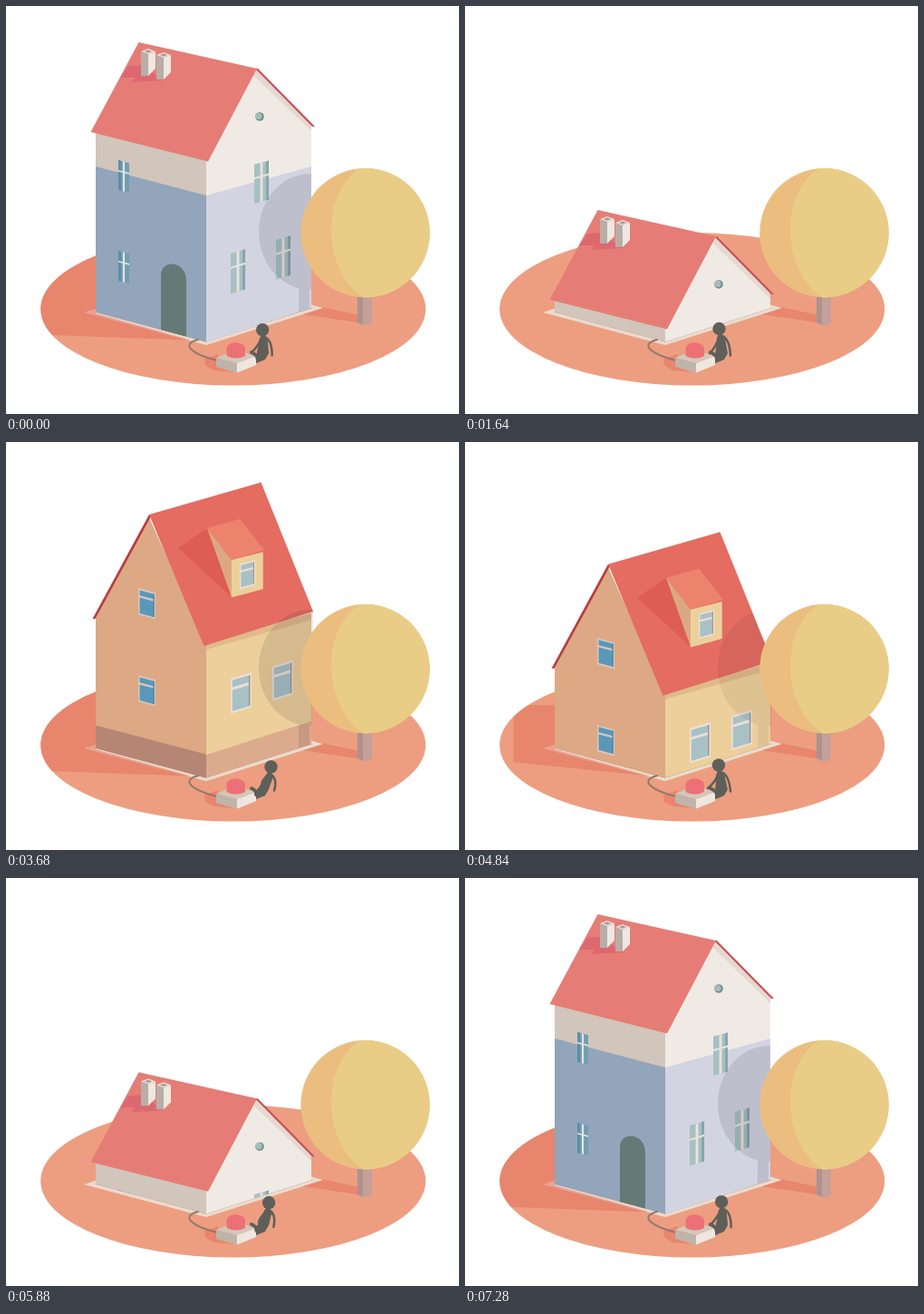
An HTML page with a canvas that plays this animation: 500x450 px, repeating every 7480 ms.

```html
<!DOCTYPE html>
<html lang="en">
<head>
<meta charset="utf-8">
<title>House switch</title>
<style>
html, body { margin: 0; width: 100%; height: 100%; overflow: hidden; background: #fff; }
canvas { display: block; }
</style>
</head>
<body>
<canvas id="stage" width="500" height="450"></canvas>
<script>
const ctx = document.getElementById('stage').getContext('2d');
const LOOP = 7480, DEPTH = 345;
const INK = '#5f5f59';

const clamp = v => Math.min(1, Math.max(0, v));
const ease = u => (1 - Math.cos(Math.PI * clamp(u))) / 2;
const span = (t, from, to) => ease((t - from) / (to - from));

function trace(pts) {
  ctx.beginPath();
  for (let i = 0; i < pts.length; i += 2) ctx.lineTo(pts[i], pts[i + 1]);
  ctx.closePath();
}
function poly(color, ...pts) {
  trace(pts);
  ctx.fillStyle = color;
  ctx.fill();
}
function oval(color, x, y, rx, ry = rx) {
  ctx.beginPath();
  ctx.ellipse(x, y, rx, ry, 0, 0, 7);
  ctx.fillStyle = color;
  ctx.fill();
}
function curve(color, width, x, y, cx, cy, ex, ey) {
  ctx.beginPath();
  ctx.moveTo(x, y);
  ctx.quadraticCurveTo(cx, cy, ex, ey);
  ctx.strokeStyle = color;
  ctx.lineWidth = width;
  ctx.lineCap = 'round';
  ctx.stroke();
}
function scoped(draw) {
  ctx.save();
  draw();
  ctx.restore();
}

// Walls map (u along the wall, height h) to the stage; the right one recedes.
const left = (u, h) => [99 + 122 * u, 339 + 32 * u - h];
const right = (u, h) => [221 + 116 * u, 371 - 38 * u - h * (1 - .037 * u)];

function quad(wall, color, u, h, w, t) {
  poly(color, ...wall(u, h), ...wall(u + w, h), ...wall(u + w, h + t), ...wall(u, h + t));
}
const inset = (wall, u, h, w, t) => (color, x, y, pw, ph) =>
  quad(wall, color, u + x * w, h + y * t, pw * w, ph * t);

function gable(wall, color, eave, peak) {
  poly(color, ...wall(0, 0), ...wall(0, eave), ...wall(.48, peak), ...wall(1, eave), ...wall(1, 0));
}

function crossWindow(wall, u, h, w, t) {
  const part = inset(wall, u, h, w, t), shaded = wall === left;
  part(shaded ? '#719eb3' : '#a6c1c1', 0, 0, 1, 1);
  part(shaded ? '#5b90a8' : '#87a5ab', shaded ? 0 : .82, 0, shaded ? .25 : .18, 1);
  part('#e9e2db', .41, 0, .18, 1);
  part('#e9e2db', 0, .62, 1, .05);
}
function framedWindow(wall, u, h, w, t) {
  const part = inset(wall, u, h, w, t), shaded = wall === left;
  const frame = shaded ? '#d8c8bf' : '#eadfd6';
  part(frame, 0, 0, 1, 1);
  part(shaded ? '#5b98b8' : '#a8c1c5', .08, .06, .84, .88);
  part(shaded ? '#4c82a0' : '#a58f8d', .87, .06, .06, .88);
  part(frame, 0, .66, .87, .08);
}

function chimney(x, y) {
  const side = (color, dx, dy, sx, sy, h) =>
    poly(color, x + dx, y + dy, x + dx + sx, y + dy + sy, x + dx + sx, y + dy + sy + h, x + dx, y + 27);
  const lid = (color, r) => poly(color, x + 8 - r, y, x + 8, y - r * .38, x + 8 + r, y, x + 8, y + r * .38);
  side('#b8aea7', 0, 0, 8, 3, 24);
  side('#efe8e1', 8, 3, 8, -3, 19);
  lid('#e6ddd4', 8);
  lid('#a29790', 4);
}

function blueHouse() {
  quad(left, '#d2c5bb', 0, 0, 1, 204);
  quad(left, '#92a5bb', 0, 0, 1, 162);
  gable(right, '#f0eae4', 203, 290);
  quad(right, '#d2d4e1', 0, 0, 1, 162);
  poly('#e4d8d0', 276, 70, 337, 131, 337, 138, 273, 76);
  poly('#c84f58', 275, 69, 278, 69, 341, 133, 338, 133);
  poly('#e57d76', 146.5, 40, 277, 69, 223, 171.5, 93.5, 139);
  poly('#de686f', 135, 66, 149, 65, 175, 82, 138, 84, 143, 79, 126, 79);
  chimney(149, 50);
  chimney(166, 54);
  for (const h of [42.5, 142.5]) crossWindow(left, .205, h, .098, 33);
  for (const u of [.233, .664]) crossWindow(right, u, 45, .138, 45);
  crossWindow(right, .457, 138, .138, 44);
  oval('#728f94', 280, 122, 4.8);
  oval('#a5bebb', 279, 121.5, 3.6);
  ctx.beginPath();
  ctx.moveTo(171, 358);
  ctx.lineTo(171, 297);
  ctx.bezierCurveTo(171, 279, 199, 280, 199, 304);
  ctx.lineTo(199, 365);
  ctx.fillStyle = '#657976';
  ctx.fill();
}

function sandHouse() {
  gable(left, '#dda884', 147, 272);
  quad(left, '#b58674', 0, 0, 1, 26.5);
  quad(right, '#eccf9b', 0, 0, 1, 150);
  quad(right, '#dfba8b', 0, 142, 1, 8);
  quad(right, '#dcaa8d', 0, 0, 1, 26);
  poly('#b93c3f', 158, 80, 160, 82, 98.5, 195, 95.5, 195);
  poly('#e46c60', 158, 80, 281.5, 44.5, 339, 187, 218.5, 225);
  poly('#dd5d54', 190, 117, 222, 95, 249, 171);
  poly('#dca884', 222, 95, 249, 130, 249, 171);
  quad(right, '#ecd09b', .241, 192, .3, 42);
  poly('#ec846d', 222, 95, 258, 85, 285, 119, 249, 130);
  framedWindow(right, .319, 199, .147, 28);
  for (const h of [65, 161]) framedWindow(left, .385, h, .156, 29);
  for (const u of [.233, .629]) framedWindow(right, u, 63, .198, 39);
}

const HOLE = [98, 337.5, 214.5, 300, 338, 333, 221, 370.5];
const BLUE_SIDE = [221, 171, 276, 70, 337, 132, 337, 333, 221, 371];
const SAND_SIDE = [218, 225, 281, 45, 339, 187, 337, 333, 221, 371];

function sunkHouse(draw, side, drop) {
  if (drop >= DEPTH - 1) return;
  scoped(() => {
    trace([86, 0, 86, 337, 98, 337.5, 221, 370.5, 338, 333, 350, 333, 350, 0]);
    ctx.clip();
    ctx.translate(0, drop);
    draw();
    trace(side);
    ctx.clip();
    ctx.translate(0, -drop);
    ctx.globalAlpha = clamp(1 - drop / 150);
    ctx.globalCompositeOperation = 'multiply';
    ctx.beginPath();
    ctx.ellipse(336, 249, 57, 64, 0, 0, 7);
    ctx.rect(323, 312, 12, 30);
    ctx.fillStyle = '#e7e6e9';
    ctx.fill();
  });
}

function ground(drop) {
  const reach = clamp(1 - drop / 140);
  oval('#ed9e80', 250.7, 334.3, 212.5, 84.2);
  oval('#e8866e', 284, 321, 35, 13);
  poly('#e8866e', 300, 322, 391, 341, 391, 349.5, 300, 336);
  poly('#e9dccd', 86, 338, 214.5, 296, 350, 333, 221, 374);
  scoped(() => {
    trace(HOLE);
    ctx.clip();
    ctx.fillStyle = '#cc705e';
    ctx.fillRect(90, 290, 124.5, 90);
    ctx.fillStyle = '#955449';
    ctx.fillRect(214.5, 290, 130, 90);
  });
  if (reach > 0) scoped(() => {
    ctx.beginPath();
    ctx.ellipse(250.7, 334.3, 212.5, 84.2, 0, 0, 7);
    ctx.clip();
    const x = 99 - 75 * reach, top = 339 - 80 * reach;
    poly('rgba(227,110,91,.5)', 99, top, x, top, x, 339 + 23 * reach, 204, 368.5, 99, 339);
  });
}

function tree() {
  ctx.beginPath();
  ctx.roundRect(388, 310, 16, 42, [0, 0, 6, 6]);
  ctx.fillStyle = '#c4a098';
  ctx.fill();
  poly('#ad9190', 388, 310, 394, 310, 394, 351, 388, 349);
  oval('#ebbe80', 396.5, 250.2, 71.2);
  ctx.beginPath();
  ctx.arc(396.5, 250.2, 71.2, -1.64, 1.59);
  ctx.bezierCurveTo(350, 294, 346, 206, 391, 179);
  ctx.fillStyle = '#e9cd86';
  ctx.fill();
}

function switchBox(press) {
  poly('#e9856e', 219, 389, 234, 384, 236, 399, 252, 404, 230, 402, 220, 397);
  ctx.beginPath();
  ctx.moveTo(233, 391);
  ctx.bezierCurveTo(205, 384, 192, 373, 212, 368);
  ctx.strokeStyle = '#94796e';
  ctx.lineWidth = 2;
  ctx.stroke();
  poly('#d3c7bb', 232, 388, 253, 379.5, 276, 386, 255, 394);
  poly('#bfb4a9', 232, 388, 255, 394, 255, 404.5, 232, 398);
  poly('#eee6df', 255, 394, 276, 386, 276, 396, 255, 404.5);
  const top = 371 + 6 * press;
  ctx.beginPath();
  ctx.moveTo(243.5, 386);
  ctx.lineTo(243.5, top + 7);
  ctx.bezierCurveTo(244, top - 2, 263, top - 2, 264, top + 7);
  ctx.lineTo(264, 386);
  ctx.quadraticCurveTo(254, 391, 243.5, 386);
  ctx.fillStyle = '#ec7076';
  ctx.fill();
}

// lean: 0 hunched, 1 tilted back; reach: 1 with the hand on the button.
function figure(lean, reach) {
  const headX = 280.5 + 12 * lean - 4 * reach;
  const headY = 356 + 2.3 * Math.sqrt(lean) + 3 * reach;
  const x = headX + 1.5 - 4 * lean, y = headY + 11;
  const hipX = 280 - 2 * lean;
  curve(INK, 2.5, x + 2, y - 3, x + 10, y + 2 * lean, 293 + 3 * lean, 385.5 - lean);
  curve(INK, 8, x, y, 286, 380, hipX, 388);
  poly(INK, x - 4, y, x + 5, y, 290, 383, 286, 390, 276, 394, 276, 387);
  curve(INK, 4, hipX, 390, 276, 384, 271, 382);
  curve(INK, 2.5, x - 2, y - 1, 277 + 3 * lean - 8 * reach, 376 - 2 * reach,
    270 + 14 * lean * lean - 14 * reach, 383 - 5 * lean * lean - 9 * reach);
  curve(INK, 5, headX, headY, headX, headY, x, y);
  oval(INK, headX, headY, 7.2);
}

function render(t) {
  const blueDrop = DEPTH * (span(t, 1050, 2180) - span(t, 5566, 6200));
  const sandDrop = DEPTH * (1 - span(t, 2360, 3080) + span(t, 4546, 5676));
  const pulse = (s, rise, hold, fall) => [0, 3500].reduce((sum, lag) =>
    sum + span(t - lag, s - rise, s) - span(t - lag, s + hold, s + hold + fall), 0);
  const lean = .22 * (1 - span(t, 200, 900)) + span(t, 2050, 2560) - span(t, 3680, 4400)
    + span(t, 5500, 6040) - .78 * span(t, 6800, 7280);

  ctx.fillStyle = '#fff';
  ctx.fillRect(0, 0, 500, 450);
  ground(Math.min(blueDrop, sandDrop));
  sunkHouse(blueHouse, BLUE_SIDE, blueDrop);
  sunkHouse(sandHouse, SAND_SIDE, sandDrop);
  tree();
  switchBox(pulse(960, 100, 130, 150));
  figure(clamp(lean), pulse(900, 700, 200, 320));
}

const start = performance.now();
function tick() {
  render((performance.now() - start) % LOOP);
  requestAnimationFrame(tick);
}
tick();
</script>
</body>
</html>
```
